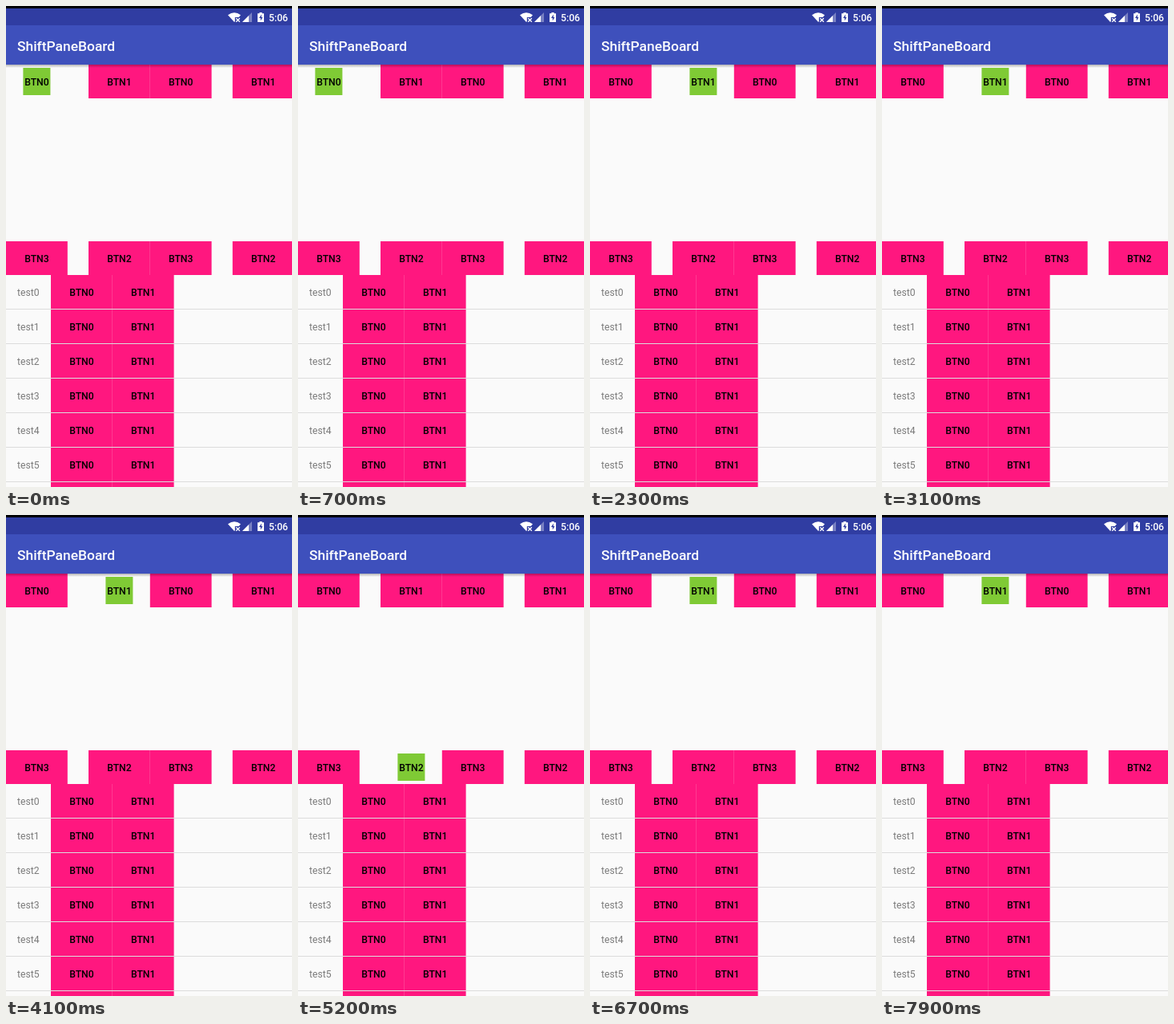
Animation, 357 px wide and 599 px high, one loop 8000 ms. Source, as an HTML page:

```html
<!DOCTYPE html>
<html lang="en">
<head>
<meta charset="utf-8">
<style>
html, body { margin: 0; width: 100%; height: 100%; overflow: hidden; background: #fafafa; }
svg { display: block; font: 500 12.2px Roboto, sans-serif; }
.btn { text-anchor: middle; }
.label { font-weight: 400; fill: #7c7c7c; }
.title { font-size: 17.4px; fill: #fff; }
.time { fill: #fff; }
</style>
</head>
<body>
<svg id="stage" width="357" height="599" viewBox="0 0 357 599">
  <defs>
    <linearGradient id="shade" x2="0" y2="1">
      <stop stop-color="#000" stop-opacity=".28"/>
      <stop offset="1" stop-color="#000" stop-opacity="0"/>
    </linearGradient>
  </defs>
  <rect width="357" height="599" fill="#fafafa"/>
  <g id="content"></g>
  <rect y="73" width="357" height="4" fill="url(#shade)"/>
  <rect width="357" height="3" fill="#000"/>
  <rect y="3" width="357" height="21" fill="#303da2"/>
  <rect y="24" width="357" height="49" fill="#3e50bc"/>
  <text class="title" x="14" y="55.5">ShiftPaneBoard</text>
  <g fill="#fff">
    <path d="M277 11.2Q285 5.5 293 11.2L290.6 14H285.8V19.2L285 20Z"/>
    <path d="M287.2 15.2l4.6 4.6m0-4.6l-4.6 4.6" stroke="#fff" stroke-width="1.3"/>
    <path d="M295 20L307 8V20Z" opacity=".35"/>
    <path d="M295 20L303 12V20Z"/>
    <path d="M314 9.2h2.4V8h3.2v1.2h2.4V20h-8Z"/>
    <path d="M318.8 10.5l-2.8 4.6h1.8v3.4l2.6-4.6h-1.6Z" fill="#303da2"/>
  </g>
  <text class="time" x="328" y="18.6">5:06</text>
</svg>
<script>
const content = document.getElementById("content");
const BTN_W = 76.8, BTN_H = 42, ROW_H = 43, LIST_Y = 335;
const LOOP = 8000;

function add(tag, attrs, text = "") {
  const el = document.createElementNS("http://www.w3.org/2000/svg", tag);
  for (const key in attrs) el.setAttribute(key, attrs[key]);
  el.textContent = text;
  content.append(el);
  return el;
}

function button(x, y, name) {
  const pink = add("rect", { x, y, width: BTN_W, height: BTN_H, fill: "#ff177f" });
  const mark = add("rect", { x: x + 21.4, y: y + 4, width: 34, height: 34, fill: "#7fca35" });
  mark.style.display = "none";
  add("text", { class: "btn", x: x + BTN_W / 2, y: y + 25.7 }, name);
  return focused => {
    pink.style.display = focused ? "none" : "";
    mark.style.display = focused ? "" : "none";
  };
}

// Two groups with a button in each corner, the second cut off by the screen edge
const corners = [];
for (const left of [0, 179.8]) {
  corners.push(
    button(left, 73, "BTN0"), button(left + 103, 73, "BTN1"),
    button(left + 103, 293, "BTN2"), button(left, 293, "BTN3"));
}

for (let i = 0; i < 7; i++) {
  const y = LIST_Y + i * ROW_H;
  add("text", { class: "label", x: 14, y: y + 25.7 }, "test" + i);
  button(56, y, "BTN0");
  button(56 + BTN_W, y, "BTN1");
  add("rect", { y: y + BTN_H, width: 357, height: 1, fill: "#dcdcdc" });
}

// [start time, focused corner]
const steps = [[0, 0], [2300, 1], [4700, 2], [5900, 1]];

function draw(now) {
  const t = now % LOOP;
  const current = steps.filter(([start]) => start <= t).pop()[1];
  corners.forEach((setFocus, i) => setFocus(i === current));
  requestAnimationFrame(() => draw(performance.now()));
}
draw(performance.now());
</script>
</body>
</html>
```
